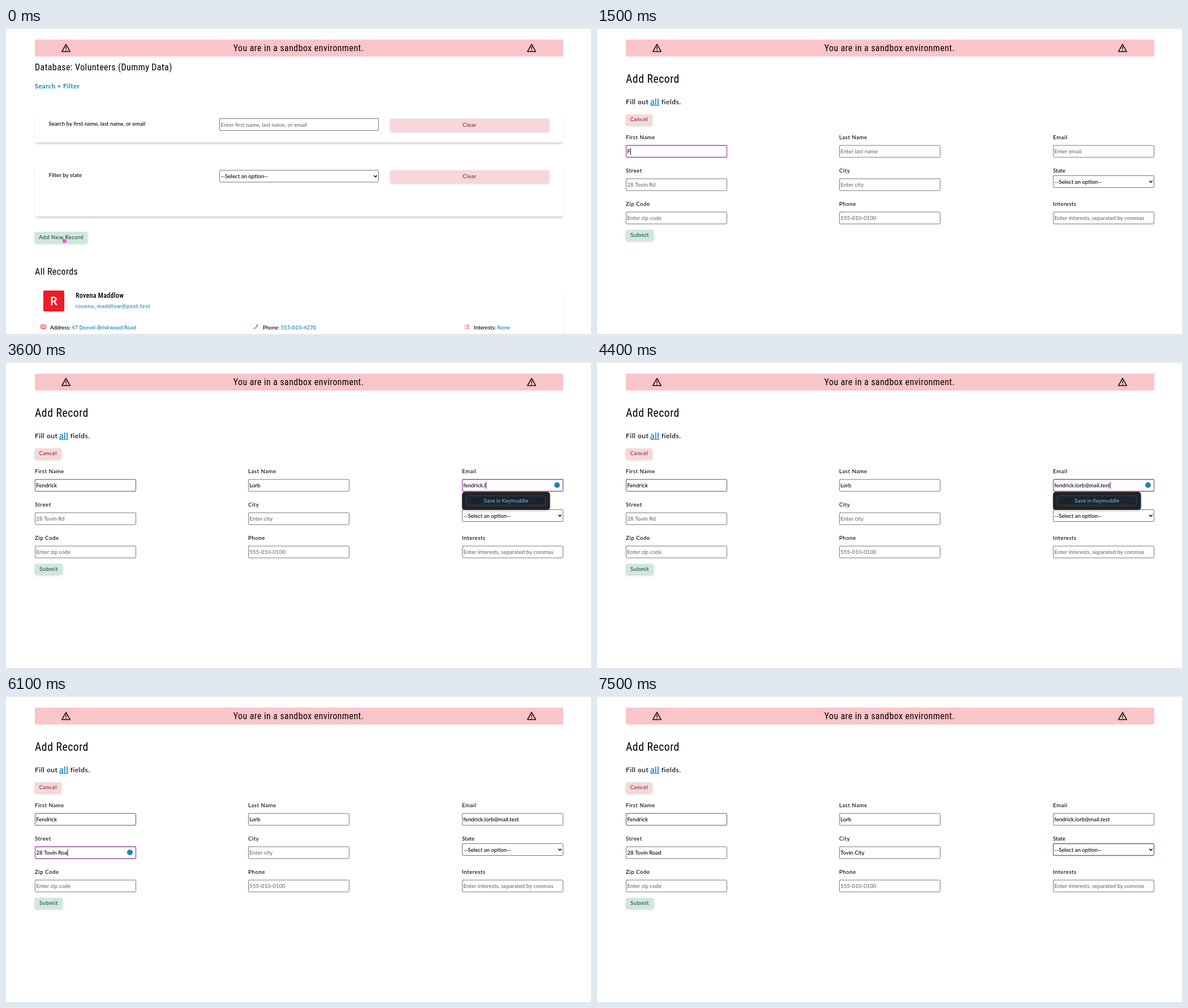
Animation of 1034x542 px, one loop 8000 ms. Source, as an HTML page with a canvas:

```html
<!DOCTYPE html>
<html lang="en">
<head>
<meta charset="utf-8">
<title>Add Record</title>
<style>
html, body { margin: 0; width: 100%; height: 100%; overflow: hidden; background: #fff; }
canvas { display: block; }
</style>
</head>
<body>
<canvas id="stage" width="1034" height="542"></canvas>
<script>
const ctx = document.getElementById('stage').getContext('2d');
const LOOP = 8000, STEP = 100;
const BODY = 'Lato, sans-serif';
const HEAD = '"Roboto Condensed", Roboto, sans-serif';
const POPUP = 'Inter, sans-serif';
const LINK = '#087dbf', RED = '#e02434', PURPLE = '#9d48a6', GREY = '#6c6c6c';
const PINK_BUTTON = ['#f7d7da', '#7a2630'];
const GREEN_BUTTON = ['#d0e7dc', '#174f37'];

// Headings are tracked tighter when only the regular-width cut exists.
const widthIn = family => {
  ctx.font = `16px ${family}`;
  return ctx.measureText('sandbox environment').width;
};
const HEAD_TRACK = widthIn(HEAD) < widthIn('Roboto, sans-serif') - 4 ? 0.026 : -0.028;

function text(str, x, y, { size = 9.7, color = '#000', family = BODY, weight = 500, track = 0, align = 'left' } = {}) {
  ctx.font = `${weight} ${size}px ${family}`;
  ctx.letterSpacing = `${track}px`;
  ctx.textAlign = align;
  ctx.fillStyle = color;
  ctx.fillText(str, x, y);
  return ctx.measureText(str).width;
}

const heading = (str, x, y, size = 16, align = 'left', weight = 400) =>
  text(str, x, y, { size, align, weight, family: HEAD, track: size * HEAD_TRACK });

function roundRect(x, y, w, h, r, fill, stroke, line = 1) {
  ctx.beginPath();
  ctx.roundRect(x, y, w, h, r);
  if (fill) { ctx.fillStyle = fill; ctx.fill(); }
  if (stroke) { ctx.strokeStyle = stroke; ctx.lineWidth = line; ctx.stroke(); }
}

function path(points, color, line, closed) {
  ctx.beginPath();
  points.forEach(([x, y]) => ctx.lineTo(x, y));
  if (closed) ctx.closePath();
  ctx.strokeStyle = color;
  ctx.lineWidth = line;
  ctx.lineJoin = ctx.lineCap = 'round';
  ctx.stroke();
}

function dot(x, y, r, color) {
  ctx.beginPath();
  ctx.arc(x, y, r, 0, Math.PI * 2);
  ctx.fillStyle = color;
  ctx.fill();
}

function raised(x, y, w, h, r, fill, alpha = 0.18) {
  ctx.save();
  ctx.shadowColor = `rgba(0,0,0,${alpha})`;
  ctx.shadowBlur = 4;
  ctx.shadowOffsetY = 2;
  roundRect(x, y, w, h, r, fill);
  ctx.restore();
}

// The shadow is inset so that it shows mainly under the bottom edge.
function card(y, h) {
  raised(52.5, y + 8, 931, h - 8, 3, '#fff', 0.25);
  roundRect(51, y, 934, h, 3, '#fff');
}

function button(label, x, y, w, h, [fill, color]) {
  raised(x, y, w, h, 2, fill);
  text(label, x + w / 2, y + h / 2 + 3.2, { color, track: 0.5, align: 'center' });
}

function box(x, y, w, focused, dark) {
  const color = focused ? PURPLE : dark ? '#4d555b' : '#767676';
  roundRect(x + 0.5, y + 0.5, w - 1, 21, 1.5, '#fff', color, focused ? 1.3 : 1);
}

function select(x, y, w, focused) {
  box(x, y, w, focused);
  text('--Select an option--', x + 3, y + 14.8);
  const cx = x + w - 6;
  path([[cx - 2.3, y + 10], [cx, y + 12.5], [cx + 2.3, y + 10]], '#000', 1.4);
}

function warning(x, y) {
  path([[x, y - 6.5], [x + 7.3, y + 6.3], [x - 7.3, y + 6.3]], '#111', 1.6, true);
  path([[x, y - 1.8], [x, y + 1.6]], '#111', 1.5);
  dot(x, y + 4, 0.9, '#111');
}

function banner() {
  ctx.fillStyle = '#ededee';
  ctx.fillRect(0, 0, 1034, 2);
  roundRect(51, 20.5, 934, 30, 2, '#fac5c8');
  heading('You are in a sandbox environment.', 517, 41, 16, 'center');
  warning(106, 35.5);
  warning(929, 35.5);
}

function detail(label, value, x, valueX) {
  text(label, x, 534, { size: 9.5 });
  text(value, valueX, 534, { size: 9.6, color: LINK });
}

function listPage() {
  heading('Database: Volunteers (Dummy Data)', 51, 75);
  text('Search + Filter', 51, 106.5, { size: 11, weight: 700, color: LINK, track: 0.6 });

  card(146, 56.5);
  text('Search by first name, last name, or email', 75.5, 172.7);
  box(377, 160, 282);
  text('Enter first name, last name, or email', 379.5, 174.5, { color: GREY });
  button('Clear', 679, 160.5, 281, 22, PINK_BUTTON);

  card(238, 95.5);
  text('Filter by state', 75.5, 263.7);
  select(377, 251.5, 282);
  button('Clear', 679, 252, 281, 22, PINK_BUTTON);

  button('Add New Record', 51, 361, 93, 19.5, GREEN_BUTTON);
  heading('All Records', 51, 437);

  card(458, 110);
  roundRect(66, 465, 37, 37, 2, '#ec1d27');
  text('R', 84.5, 490.5, { size: 20, weight: 700, color: '#fff', align: 'center' });
  heading('Rovena Maddlow', 123, 478, 12, 'left', 500);
  text('rovena_maddlow@post.test', 123, 496, { color: LINK, track: 0.6 });

  roundRect(61.5, 526, 9, 6.5, 1, null, RED);
  dot(64.3, 528.6, 1.1, RED);
  path([[67, 528], [69, 528]], RED, 0.8);
  path([[63, 530.8], [69, 530.8]], RED, 0.8);
  path([[437.8, 532.5], [441, 531.2], [444.2, 527.8], [444.6, 525.8], [442.8, 526]], RED, 1.1);
  for (const y of [526.2, 529.2, 532.2]) {
    dot(811.5, y, 0.8, RED);
    path([[814, y], [818.5, y]], RED, 1);
  }
  detail('Address:', '47 Dorvel-Briskwood Road', 78, 116);
  detail('Phone:', '555-010-4270', 454, 485.5);
  detail('Interests:', 'None', 827, 868);
}

// Typed length follows [time, characters] keys; focus gives the active span.
const COLS = [51, 428, 806];
const FIELDS = [
  { label: 'First Name', hint: 'Enter first name', value: 'Fendrick', focus: [1300, 2200], keys: [[1400, 0], [1500, 1], [2100, 8]] },
  { label: 'Last Name', hint: 'Enter last name', value: 'Lorb', focus: [2200, 2700], keys: [[2200, 0], [2300, 1], [2500, 4]] },
  { label: 'Email', hint: 'Enter email', value: 'fendrick.lorb@mail.test', focus: [2800, 4500], icon: 3000, keys: [[3200, 0], [3300, 4], [3600, 10], [4100, 19], [4400, 23]] },
  { label: 'Street', hint: '28 Tovin Rd', value: '28 Tovin Road', focus: [4500, 6400], icon: 4700, keys: [[4800, 0], [5000, 3], [5600, 9], [5900, 10], [6200, 13]] },
  { label: 'City', hint: 'Enter city', value: 'Tovin City', focus: [6400, 7300], icon: 6500, keys: [[6600, 0], [6700, 1], [7200, 10]] },
  { label: 'State', focus: [7300, LOOP] },
  { label: 'Zip Code', hint: 'Enter zip code' },
  { label: 'Phone', hint: '555-010-0100' },
  { label: 'Interests', hint: 'Enter interests, separated by commas' }
];

function interpolate(keys, t) {
  if (t <= keys[0][0]) return keys[0][1];
  for (let i = 1; i < keys.length; i++) {
    const [t0, a] = keys[i - 1], [t1, b] = keys[i];
    if (t <= t1) return a + (b - a) * (t - t0) / (t1 - t0);
  }
  return keys[keys.length - 1][1];
}

const within = (t, [from, to]) => t >= from && t < to;

function field(f, i, t) {
  const x = COLS[i % 3], top = 208 + 59 * Math.floor(i / 3);
  const focused = Boolean(f.focus) && within(t, f.focus);
  const isState = f.label === 'State';
  text(f.label, x, top - 11, { track: isState ? 0 : 0.5 });
  if (isState) return select(x, top - 6, 179, focused);

  const typed = f.value ? f.value.slice(0, Math.round(interpolate(f.keys, t))) : '';
  box(x, top - 0.5, 179, focused, i === 0 && t >= f.focus[1]);
  const width = text(typed || f.hint, x + 2.3, top + 14, { color: typed ? '#000' : GREY });
  if (!focused) return;
  ctx.fillStyle = '#000';
  ctx.fillRect(x + 2.5 + (typed ? width : 0), top + 4.5, 0.9, 12);
  if (f.icon && t >= f.icon) dot(x + 168, top + 10, 5, '#2a7fb5');
}

function popup(x, y, h) {
  raised(x, y, 155.5, h, 5, '#232324', 0.2);
}

function popups(t) {
  if (within(t, [2800, 4500])) {
    popup(806, 230, 32);
    roundRect(813.5, 237, 140, 17, 4, '#1d2329', '#165483');
    text('Save in Keymuddle', 883.5, 248.7, { size: 8.8, weight: 400, family: POPUP, color: '#79bdf0', align: 'center' });
  }
  if (within(t, [4700, 5400])) {
    popup(51, 289, 38);
    text('No items to show.', 63.5, 310.8, { size: 8.7, family: POPUP, color: '#f2f2f2' });
  }
  if (within(t, [6500, 6800])) {
    popup(428, 289, 37);
    text('Farhaven', 440.5, 305, { size: 8.6, family: POPUP, color: '#f5f5f5' });
    text('52 Mulvane St Apt 7, 00417, NY, Unit...', 440.5, 315.2, { size: 7.3, weight: 400, family: POPUP, color: '#b5b5b7' });
  }
}

function formPage(t) {
  heading('Add Record', 51, 96.7, 19.7);
  text('Fill out', 51, 135, { size: 12, track: 0.5 });
  text('all', 94, 135.5, { size: 15, weight: 600, color: LINK, track: 0.5 });
  ctx.fillStyle = LINK;
  ctx.fillRect(94, 136.5, 16.5, 1.2);
  text('fields.', 113.8, 135, { size: 12, track: 0.5 });
  button('Cancel', 51, 153, 46.5, 18.5, PINK_BUTTON);
  button('Submit', 51, 357.5, 49, 18.5, GREEN_BUTTON);
  FIELDS.forEach((f, i) => field(f, i, t));
  popups(t);
}

function arrow(x, y) {
  ctx.beginPath();
  for (const [dx, dy] of [[0, 0], [0, 9], [2, 7.3], [3.6, 10.5], [5, 9.8], [3.5, 6.6], [6, 6.3]]) ctx.lineTo(x + dx, y + dy);
  ctx.closePath();
  ctx.fillStyle = '#f415d8';
  ctx.fill();
}

function hand(x, y) {
  roundRect(x - 3, y - 2, 7, 6, 2.5, '#f54fd6');
  path([[x - 1.5, y], [x - 2.5, y - 4]], '#f54fd6', 1.6);
}

function cursor(t) {
  if (t < 200) return hand(103, 376.5);
  if (t >= 1400) return;
  const u = Math.min(1, Math.max(0, (t - 500) / 700));
  const ease = u * u * (3 - 2 * u);
  arrow(101.5 + 8 * ease, 372.5 - 156 * ease);
}

function draw(now) {
  const t = Math.floor((now % LOOP) / STEP) * STEP;
  ctx.fillStyle = '#fff';
  ctx.fillRect(0, 0, 1034, 542);
  banner();
  if (t < 200) listPage();
  else formPage(t);
  cursor(t);
}

const start = performance.now();
function tick() {
  draw(performance.now() - start);
  requestAnimationFrame(tick);
}
tick();
</script>
</body>
</html>
```
